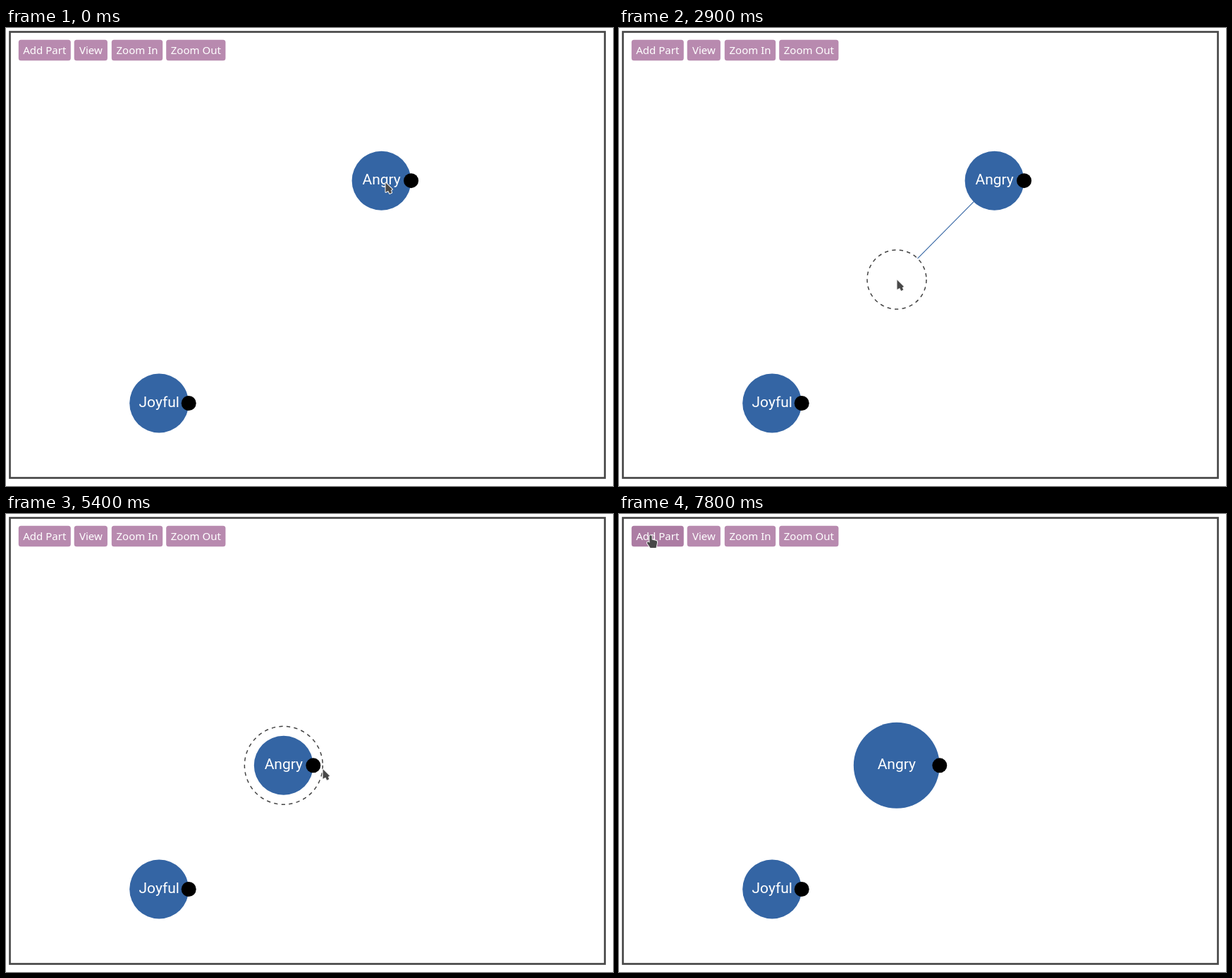
Animation, 861 px wide and 650 px high, one loop 8000 ms. Source, as an HTML page:

```html
<!DOCTYPE html>
<html lang="en">
<head>
<meta charset="utf-8">
<title>Parts editor</title>
<style>
  html, body { margin: 0; width: 100%; height: 100%; overflow: hidden; background: #fff; }
  svg { display: block; width: 861px; height: 650px; }
  text { fill: #fff; text-anchor: middle; }
  .button rect { fill: #b88aaf; }
  .button.hover rect { fill: #ac7ca3; }
  .button text { font: 15px "Noto Sans", sans-serif; }
  .part text { font: 21px Roboto, sans-serif; }
  .body { fill: #3465a4; }
  #ring { fill: none; stroke: #444; stroke-width: 1.5; stroke-dasharray: 5.3; }
  #link { stroke: #3465a4; stroke-width: 1.1; }
  #cursor path { fill: #484848; stroke: #f4f4f4; stroke-width: 2; stroke-linejoin: round; paint-order: stroke; }
</style>
</head>
<body>
<svg viewBox="0 0 861 650">
  <rect x="5.5" y="5.5" width="844" height="633" fill="none" stroke="#484848" stroke-width="2.7"/>
  <g id="buttons"></g>
  <g id="parts"></g>
  <line id="link"/>
  <circle id="ring"/>
  <g id="cursor">
    <path id="arrow" d="M.5 .5V14L4.2 12 6.2 16 9.2 14.6 7.7 11.2 10 10Z"/>
    <path id="hand" d="M-1.6 1.5Q0 -.8 1.6 1.5V6.5L8 8Q9.5 8.5 9 11L7.5 18H-.5L-5 11.5Q-5.2 9.2 -3.4 9.6L-1.6 11Z"/>
  </g>
</svg>
<script>
const $ = id => document.getElementById(id);
const LOOP = 8000, STEP = 100, R = 42, R_BIG = 61;
const HOME = [532.6, 216.7], DROP = [393.8, 356.8];
const DRAG = 1800, RELEASE = 3200, RESIZE = 4900, RESIZED = 5900, HOVER = 7200;

// Each pointer glide: start, end, destination
const START = [538, 219];
const GLIDES = [
  [0, 500, [529, 223]],
  [900, 1100, [530, 233]],
  [DRAG, 2700, [394, 357]],
  [3600, 4200, [432, 358]],
  [4800, 5700, [455, 363]],
  [6400, 6700, [272, 205]],
  [6800, 7300, [48, 27]],
  [7300, 7400, [60, 43]],
  [7700, 7800, [45, 30]]
];

const smooth = k => k * k * (3 - 2 * k);
const progress = (t, from, to) => smooth(Math.min(1, Math.max(0, (t - from) / (to - from))));

function pointerAt(t) {
  return GLIDES.reduce((at, [from, to, goal]) => {
    const k = progress(t, from, to);
    return at.map((v, i) => v + (goal[i] - v) * k);
  }, START);
}

function set(el, attrs) {
  for (const name in attrs) el.setAttribute(name, attrs[name]);
  return el;
}

function add(parent, tag, attrs = {}, label = "") {
  const el = document.createElementNS("http://www.w3.org/2000/svg", tag);
  parent.append(el);
  el.textContent = label;
  return set(el, attrs);
}

function show(el, on) {
  el.style.display = on ? "" : "none";
}

function addButton(label, x, width) {
  const g = add($("buttons"), "g", { class: "button" });
  add(g, "rect", { x, y: 16.8, width, height: 29.4, rx: 3.5 });
  add(g, "text", { x: x + width / 2, y: 37 }, label);
  return g;
}

function addPart(label) {
  const g = add($("parts"), "g", { class: "part" });
  const body = add(g, "circle", { class: "body" });
  add(g, "text", { y: 5.5 }, label);
  const handle = add(g, "circle", { r: 10.5 });
  return ([x, y], r) => {
    set(g, { transform: `translate(${x} ${y})` });
    set(body, { r });
    set(handle, { cx: r });
  };
}

const addPartButton = addButton("Add Part", 17.8, 74);
addButton("View", 96.7, 47.2);
addButton("Zoom In", 149.8, 72.4);
addButton("Zoom Out", 227.2, 84.2);
addPart("Joyful")([217.2, 532.5], R);
const placeAngry = addPart("Angry");

function draw(t) {
  const [x, y] = pointerAt(t);
  const [cx, cy] = t < RELEASE ? HOME : DROP;
  const dx = x - cx, dy = y - cy, dist = Math.hypot(dx, dy);
  placeAngry([cx, cy], t < RESIZED ? R : R_BIG);

  const dragging = t >= DRAG && t < RELEASE && dist > R;
  const resizing = t >= RESIZE && t < RESIZED;
  show($("ring"), dragging || resizing);
  show($("link"), dragging && dist > 2 * R);
  if (dragging) {
    const ux = dx / dist * R, uy = dy / dist * R;
    set($("ring"), { cx: x, cy: y, r: R });
    set($("link"), { x1: cx + ux, y1: cy + uy, x2: x - ux, y2: y - uy });
  } else if (resizing) {
    set($("ring"), { cx, cy, r: dist });
  }

  const hover = t >= HOVER;
  addPartButton.classList.toggle("hover", hover);
  show($("hand"), hover);
  show($("arrow"), !hover);
  set($("cursor"), { transform: `translate(${x} ${y})` });
}

function tick() {
  const t = performance.now() % LOOP;
  draw(Math.floor(t / STEP) * STEP);
  requestAnimationFrame(tick);
}
tick();
</script>
</body>
</html>
```
